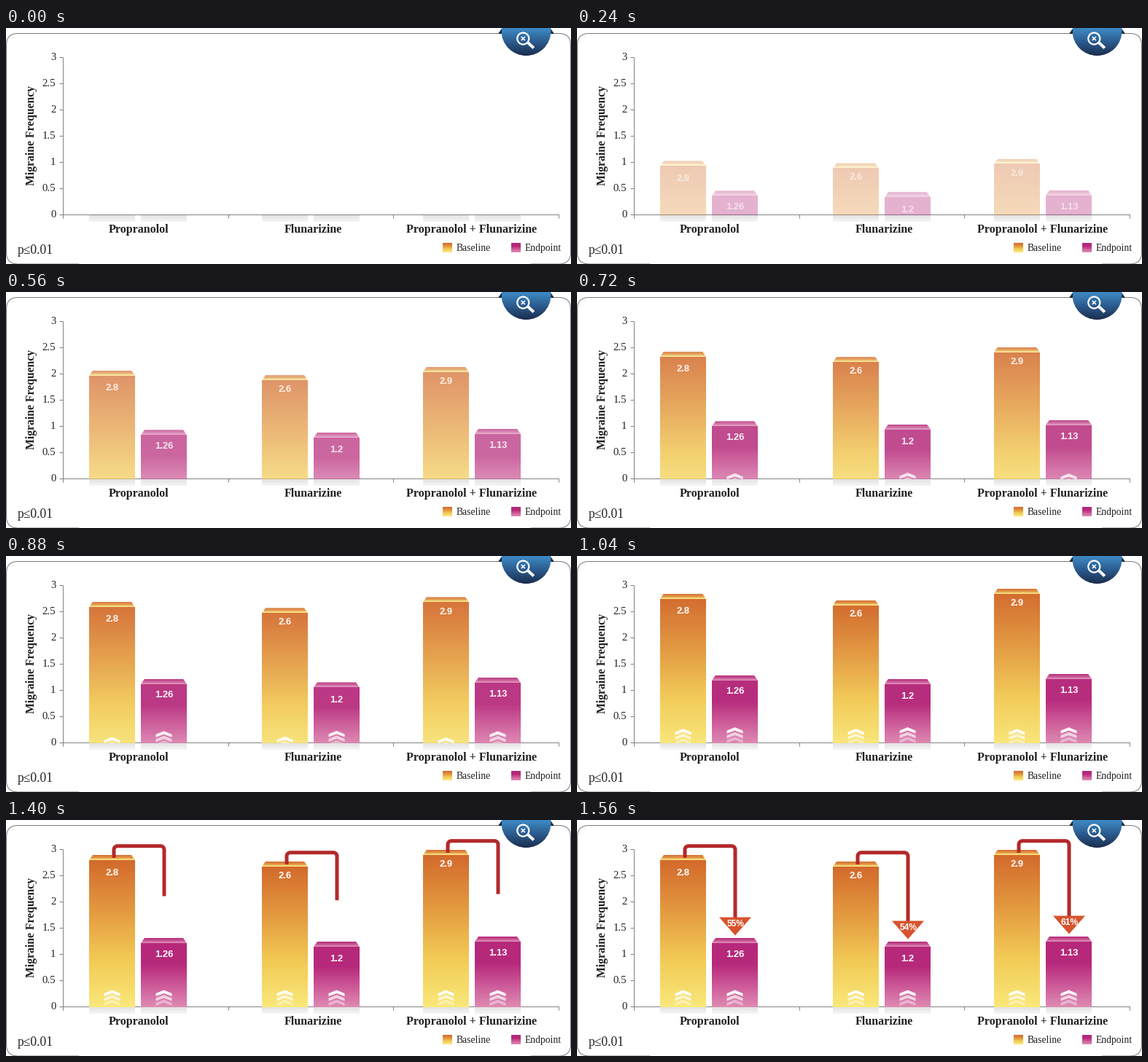
Write a matplotlib script that moves like this. It is 775 by 324 pixels and loops after 8 s.

```python
import numpy as np
import matplotlib.pyplot as plt
from matplotlib.animation import FuncAnimation
from matplotlib.colors import to_rgb
from matplotlib.patches import Circle, FancyBboxPatch, Polygon, Rectangle
from matplotlib.transforms import Affine2D

W, H, DPI = 775, 324, 100
STEP, FRAMES = 40, 200
PX = 72 / DPI
LEFT, RIGHT, TOP, AXIS_Y = 78, 758, 40, 256
FLOOR = AXIS_Y + 1
BAR_W, LID, PAIR = 63, 7, 71
RISE = 30            # frames until the bars stand still
TRACE = (30, 36)     # arrow line grows
HEAD = (35, 39)      # arrow head fades in

SERIF, SANS = "Liberation Serif", "Liberation Sans"
INK, AXIS = "#231f20", "#808285"

ORANGE = "#d36a2c", "#e3983f", "#f2c955", "#f9e87a"
ORANGE_LID = "#d87434", "#e09242", "#fae882"
PINK = "#b6287a", "#b72a7b", "#cd5a99", "#de8ab2"
PINK_LID = "#b82e7c", "#c85292", "#de8cb8"
SHADE = "#e3e3e4", "#f5f5f5"
BADGE = "#3e8ac4", "#2b5b8e", "#1c2e4e"

# name, name centre, left edge, (label, lid top, label centre) twice, fall
GROUPS = [
    ("Propranolol", 182, 114, ("2.8", 48, 71), ("1.26", 162, 183), "55%"),
    ("Flunarizine", 421.5, 351, ("2.6", 57, 75), ("1.2", 167, 190), "54%"),
    ("Propranolol + Flunarizine", 639, 572, ("2.9", 41, 60), ("1.13", 160, 182), "61%"),
]

fig = plt.figure(figsize=(W / DPI, H / DPI), dpi=DPI, facecolor="white")
ax = fig.add_axes([0, 0, 1, 1])
ax.set_xlim(0, W)
ax.set_ylim(H, 0)
ax.axis("off")


def ramp(colors, n):
    """Vertical colour ramp as an n x 1 RGB image."""
    rgb = np.array([to_rgb(c) for c in colors])
    at = np.linspace(0, len(rgb) - 1, n)
    return np.stack([np.interp(at, range(len(rgb)), ch) for ch in rgb.T], -1)[:, None]


def picture(img, x, y, w, h, z):
    return ax.imshow(img, extent=(x, x + w, y + h, y), aspect="auto",
                     interpolation="nearest", zorder=z)


def text(x, y, s, size, font=SERIF, color=INK, z=10, **kw):
    return ax.text(x, y, s, fontsize=size * PX, family=font, color=color,
                   va="baseline", zorder=z, **kw)


def line(xs, ys, color=AXIS, width=1, z=1, **kw):
    return ax.plot(xs, ys, color=color, lw=width * PX, zorder=z,
                   solid_capstyle="butt", **kw)[0]


def shape(pts, color, z, **kw):
    return ax.add_patch(Polygon(pts, fc=color, lw=0, zorder=z, **kw))


def draw_badge():
    cx = 713.5
    for side in (-1, 1):
        shape([(cx + 33 * side, 0), (cx + 38.5 * side, 8), (cx + 31 * side, 8)],
              "#1b2b40", 11)
    disc = picture(ramp(BADGE, 38), cx - 34, 0, 68, 38, 12)
    disc.set_clip_path(Circle((cx, 4), 34, transform=ax.transData))
    x, y = 709.3, 14.5
    line([x + 6, x + 14.5], [y + 5, y + 13], "white", 4, 13)
    ax.add_patch(Circle((x, y), 8, fc="none", ec="white", lw=2.2 * PX, zorder=13))
    for s in (-2.5, 2.5):
        line([x - 2.5, x + 2.5], [y - s, y + s], "white", 1.6, 13)


def draw_chart():
    ax.add_patch(FancyBboxPatch((.5, 7.5), W - 1, H - 7.5,
                                boxstyle="round,pad=0,rounding_size=16",
                                fc="white", ec="#77787b", lw=PX, zorder=0))
    # hides the part of the bars that is still below the axis
    ax.add_patch(Rectangle((100, FLOOR), 620, H - FLOOR, fc="white", lw=0, zorder=5))
    line([LEFT, LEFT], [TOP, AXIS_Y + 5])
    line([LEFT, RIGHT], [AXIS_Y, AXIS_Y])
    for i, y in enumerate(np.linspace(TOP, AXIS_Y, 7)):
        line([LEFT - 5, LEFT], [y, y])
        text(68.5, y + 4.5, f"{3 - i / 2:g}", 14.8, ha="right")
    for x in np.linspace(LEFT, RIGHT, 4).round():
        line([x, x], [AXIS_Y, AXIS_Y + 5], z=6)
    text(39, 148, "Migraine Frequency", 15.7, weight="bold", ha="center",
         rotation=90, rotation_mode="anchor")
    text(16, 310, "p≤0.01", 17.6)
    for x, name, colors in ((599, "Baseline", ORANGE), (693, "Endpoint", PINK)):
        picture(ramp(colors, 13), x, 295, 13, 13, 7)
        text(x + 18.5, 306, name, 13.6)


class Bar:
    def __init__(self, x, label, top, label_y, body, lid):
        self.drop = FLOOR - top + 1
        self.shift = Affine2D()
        move = self.shift + ax.transData
        front, mid, right = top + LID, x + BAR_W / 2, x + BAR_W
        img = np.vstack([ramp(lid, LID), ramp(body, FLOOR - front)])
        self.img = picture(img, x, top, BAR_W, FLOOR - top, 3)
        self.img.set_transform(move)
        self.img.set_clip_path(Polygon(
            [(x + 5, top), (right - 5, top), (right, front), (right, FLOOR),
             (x, FLOOR), (x, front)], transform=move))
        self.label = text(mid, label_y + 4.5, label, 13, SANS, "white", 4,
                          weight="bold", ha="center", transform=move)
        self.marks = [self.chevron(mid, 233.5 + 6.5 * i, move) for i in range(3)]
        picture(ramp(SHADE, 9), x, FLOOR, BAR_W, 9, 6)

    def chevron(self, x, y, move):
        return shape([(x - 11, y + 4.5), (x, y), (x + 11, y + 4.5), (x + 11, y + 8.5),
                      (x, y + 4.5), (x - 11, y + 8.5)], "white", 4, transform=move)

    def update(self, left):
        self.shift.clear().translate(0, self.drop * left)
        self.img.set_alpha(1 - left)
        self.label.set_alpha((1 - left) ** .5)
        for i, mark in enumerate(self.marks):
            mark.set_alpha((.95 - .27 * i) * (1 - left))


class Arrow:
    def __init__(self, x, base_top, end_top, label):
        x0, x1, top, head = x + 34, x + 103, base_top - 12.3, end_top - 28.5
        r, turn = 5, np.linspace(0, np.pi / 2, 8)
        self.xs = np.r_[x0, x0 + r - r * np.cos(turn), x1 - r + r * np.sin(turn), x1]
        self.ys = np.r_[base_top + 4, top + r - r * np.sin(turn),
                        top + r - r * np.cos(turn), head + 1]
        self.dist = np.r_[0, np.cumsum(np.hypot(np.diff(self.xs), np.diff(self.ys)))]
        self.line = line([], [], "#b3292a", 5, 8, solid_joinstyle="round")
        self.head = shape([(x1 - 22, head), (x1 + 22, head), (x1, head + 25)],
                          "#d6532d", 9)
        self.label = text(x1 + .5, head + 12.5, label, 12, SANS, "white", 10,
                          weight="bold", ha="center")

    def update(self, grown, shown):
        end = self.dist[-1] * grown
        at = np.r_[self.dist[self.dist < end], end]
        self.line.set_data(np.interp(at, self.dist, self.xs),
                           np.interp(at, self.dist, self.ys))
        self.line.set_visible(grown > 0)
        self.head.set_alpha(shown)
        self.label.set_alpha(shown)


draw_chart()
draw_badge()
bars, arrows = [], []
for name, name_x, x, base, end, fall in GROUPS:
    text(name_x, 281, name, 16, weight="bold", ha="center")
    bars += [Bar(x, *base, ORANGE, ORANGE_LID), Bar(x + PAIR, *end, PINK, PINK_LID)]
    arrows.append(Arrow(x, base[1], end[1], fall))


def progress(n, start, stop):
    return min(max((n - start) / (stop - start), 0), 1)


def update(n):
    left = (1 - progress(n, 0, RISE)) ** 2
    for bar in bars:
        bar.update(left)
    for arrow in arrows:
        arrow.update(progress(n, *TRACE), progress(n, *HEAD))
    return []


anim = FuncAnimation(fig, update, frames=FRAMES, interval=STEP, repeat=True,
                     repeat_delay=0, init_func=lambda: update(0))
plt.show()
```
